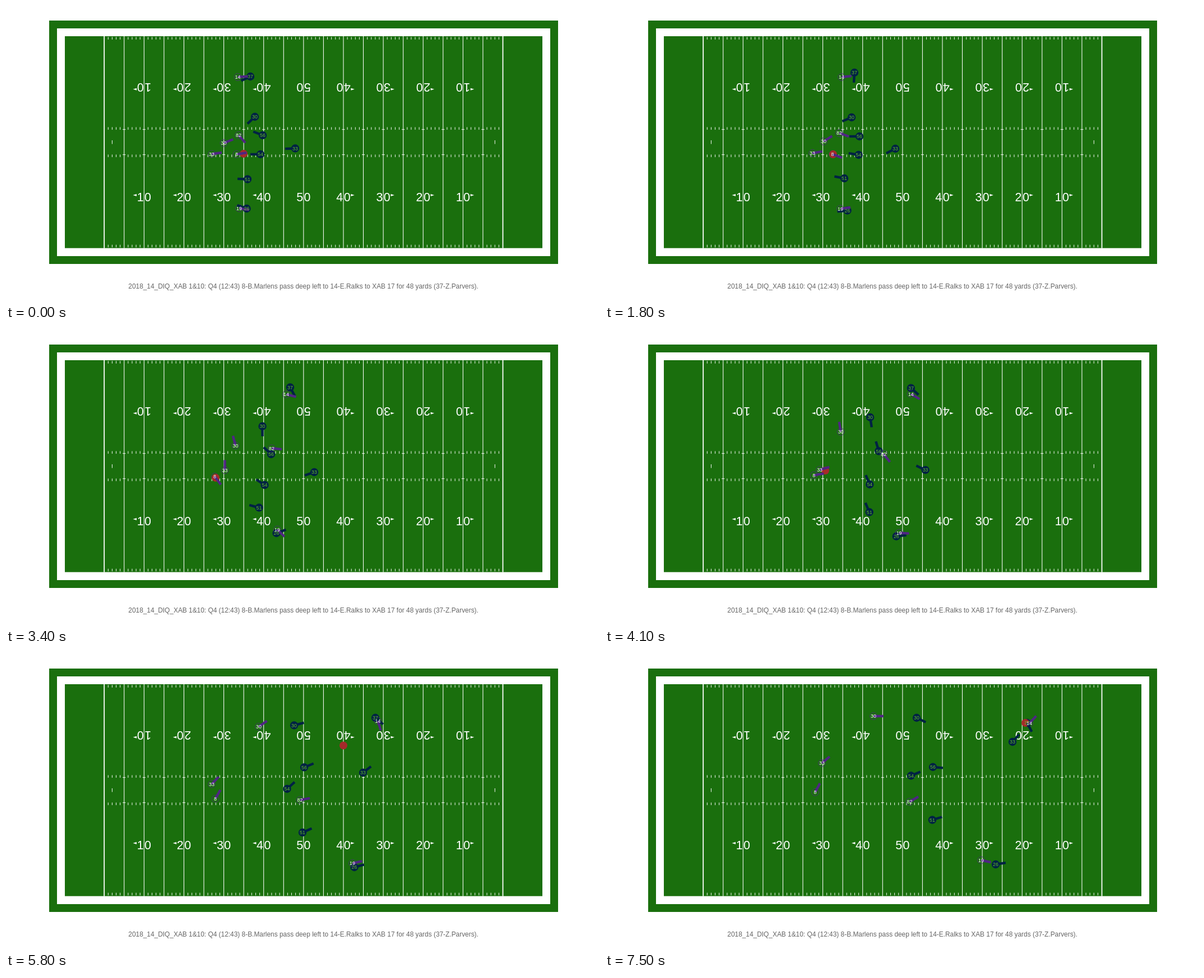
An HTML page for the animation above (7.6 s loop, 1058x529 px).

```html
<!DOCTYPE html>
<html lang="en">
<head>
<meta charset="utf-8">
<title>Play animation</title>
<style>
html, body { margin: 0; width: 100%; height: 100%; overflow: hidden; background: #fff; }
svg { display: block; width: 100%; height: 100%; }
text { font-family: "Liberation Sans", Arial, sans-serif; text-anchor: middle; }
</style>
</head>
<body>
<svg id="stage" viewBox="0 0 1058 529"></svg>
<script>
const stage = document.getElementById('stage');
const GREEN = '#1a6f0d', NAVY = '#002244', PURPLE = '#4f2683', LIME = '#69be28';
const LOOP = 7600, STEP = 100, REACH = 18;
const LEFT = 175.2, TOP = 54, BOTTOM = 432.7, YARD = 7.113;

function el(parent, tag, attrs, text) {
  const node = document.createElementNS('http://www.w3.org/2000/svg', tag);
  for (const k in attrs) node.setAttribute(k, attrs[k]);
  if (text) node.textContent = text;
  parent.appendChild(node);
  return node;
}
const layer = () => el(stage, 'g', {});
const yardX = n => LEFT + n * YARD;

function rect(x0, y0, x1, y1, fill) {
  el(stage, 'rect', { x: x0, y: y0, width: x1 - x0, height: y1 - y0, fill });
}

function drawNumbers(turn) {
  const g = el(stage, 'g', { fill: '#fff', transform: turn ? 'rotate(180 530.9 243.4)' : '' });
  for (let n = 10; n <= 90; n += 10) {
    const x = yardX(n);
    el(g, 'text', { x: x + 0.7, y: 348.6, 'font-size': 21.4, 'letter-spacing': 1.5 }, String(50 - Math.abs(50 - n)));
    if (n === 50) continue;
    const s = n < 50 ? -1 : 1;
    el(g, 'path', { d: `M${x + s * 19.8} 338l${-s * 6.5} -2v4z` });
  }
}

function drawField() {
  rect(77, 26, 985, 461, GREEN);
  rect(91, 40, 971, 447, '#fff');
  rect(105, 54, 957, 432.7, GREEN);
  let lines = '', hashes = '', ticks = '';
  for (let n = 1; n < 100; n++) {
    const x = yardX(n);
    if (n % 5) {
      for (const y of [55.3, 216.5, 265.5, 426.7]) hashes += `M${x} ${y}v4.6`;
    } else {
      lines += `M${x} ${TOP}V${BOTTOM}`;
      for (const y of [220.7, 265.7]) ticks += `M${x - 2.5} ${y}h5`;
    }
  }
  for (const n of [2, 98]) hashes += `M${yardX(n)} 240v6.6`;
  const goals = [0, 100].map(n => `M${yardX(n)} ${TOP}V${BOTTOM}`).join('');
  const stroke = (d, w) => el(stage, 'path', { d, stroke: '#fff', 'stroke-width': w, fill: 'none' });
  stroke(lines, 1.05);
  stroke(hashes, 0.95);
  stroke(ticks, 1);
  stroke(goals, 1.8);
  drawNumbers(false);
  drawNumbers(true);
  el(stage, 'text', { x: 530.6, y: 505, 'font-size': 11.9, fill: '#666' },
    '2018_14_DIQ_XAB 1&10: Q4 (12:43) 8-B.Marlens pass deep left to 14-E.Ralks to XAB 17 for 48 yards (37-Z.Parvers).');
}

drawField();
const dots = layer(), ballLayer = layer(), arms = layer(), labels = layer();
const ball = el(ballLayer, 'circle', { r: 7, fill: '#a52a2a' });

// Seconds at which players have poses; the ball is snapped at the second one.
const times = [0, 1, 1.8, 3.4, 4.7, 5.8, 6.7, 7.5];
const players = [];

function segment(ts, t) {
  let i = 0;
  while (i < ts.length - 2 && t >= ts[i + 1]) i++;
  return i;
}

function slopes(vs) {
  const h = i => times[i + 1] - times[i];
  const d = i => (vs[i + 1] - vs[i]) / h(i);
  const last = vs.length - 1;
  return vs.map((_, i) => i === 0 ? d(0) : i === last ? d(last - 1)
    : (h(i) * d(i - 1) + h(i - 1) * d(i)) / (h(i - 1) + h(i)));
}

function spline(vs) {
  const m = slopes(vs);
  return t => {
    const i = segment(times, t), h = times[i + 1] - times[i];
    const u = (t - times[i]) / h, w = 1 - u;
    return w * w * ((1 + 2 * u) * vs[i] + u * h * m[i])
      + u * u * ((3 - 2 * u) * vs[i + 1] - w * h * m[i + 1]);
  };
}

// Poses are [x, y, facing in degrees]; little happens before the snap.
function player(num, home, ...poses) {
  const [a, b] = poses;
  poses.splice(1, 0, a.map((v, i) => v + 0.22 * (b[i] - v)));
  const [x, y, dir] = [0, 1, 2].map(k => spline(poses.map(p => p[k])));
  const look = home ? { r: 7.2, fill: NAVY } : { r: 6.4, fill: 'none', stroke: PURPLE, 'stroke-opacity': 0.75 };
  players.push({
    x, y, dir,
    dot: el(dots, 'circle', look),
    arm: el(arms, 'path', { stroke: home ? NAVY : PURPLE, 'stroke-width': 4.4 }),
    label: el(labels, 'text', { 'font-size': 8.8, fill: home ? LIME : '#fff' }, num)
  });
}
const home = (num, ...poses) => player(num, true, ...poses);
const away = (num, ...poses) => player(num, false, ...poses);

home('37', [436, 126, 155], [445, 119, 93], [507, 102.5, 62], [583.5, 107, 30], [659, 114, 40], [716.5, 119, 74], [753, 123, 62]);
home('30', [444, 198, 137], [440, 199, 157], [457.5, 172, 90], [488, 143, 67], [514, 127.5, -15], [537, 117, -9], [556, 114, 26]);
home('56', [458, 231, 201], [454, 233, 180], [473, 222, 223], [503.5, 211.5, 283], [532, 202.5, 338], [563, 201, 355], [585, 202, 365]);
home('33', [516, 254.5, 178], [518, 255, 153], [550, 254, 161], [593, 242.5, 250], [637, 212, 322], [684, 185, 296], [727, 157, 312]);
home('54', [454, 265, 180], [452.5, 266, 189], [461.5, 277, 213], [483, 270, 278], [501.5, 241, 318], [525, 227, 331], [546, 217.5, 337]);
home('51', [431, 309.5, 182], [427, 308, 191], [451.5, 317.5, 195], [491.5, 329.5, 294], [529, 319, 336], [559.5, 307, 342], [584, 296.5, 343]);
home('26', [429.5, 362, 199], [432.5, 365.5, 174], [482.5, 363, 340], [555.5, 374.5, 350], [621.5, 381, 345], [666, 379, 346], [697, 376, 351]);
away('14', [413.5, 127, -4], [422, 127, -6], [500, 115, 14], [587.5, 115.5, 45], [663.5, 119.5, 73], [717, 121, 100], [757, 124, -47]);
away('30', [388.5, 245, -22], [390, 242, -32], [409.5, 206.5, -105], [431, 160.5, -82], [451, 130, -36], [467.5, 116, -24], [479, 111, 0]);
away('33', [367, 264.5, -8], [370, 263, -10], [390.5, 250.5, -90], [374.5, 248, 35], [367, 232.5, -46], [375, 211.5, -67], [387, 195, -40]);
away('8', [411.5, 265, -9], [406, 265, 20], [372.5, 262, 53], [375, 258, -61], [373.5, 258.5, -60], [373.5, 253.5, -72], [375, 247, -62]);
away('82', [415, 231, 48], [418, 227, 20], [474, 211.5, 5], [513, 235, 76], [524.5, 261, -11], [534, 265.5, -14], [543.5, 264, -30]);
away('19', [416, 361.5, 10], [420, 362.5, -8], [484, 356.5, 45], [560.5, 368.5, -30], [618, 374, -12], [651.5, 373, -16], [671, 368.5, 12]);

// Snap, drop back, throw and catch: [seconds, x, y].
const flight = [[0, 424, 264], [1, 424, 264], [1.2, 412, 264.5], [1.8, 407, 265], [3.4, 374, 264],
  [3.95, 374, 259], [4.7, 468.5, 220], [5.8, 602, 163.5], [6.7, 705, 126], [6.8, 714, 122.5], [7.5, 750, 123]];
const flightTimes = flight.map(p => p[0]);

function draw(t) {
  for (const p of players) {
    const x = p.x(t), y = p.y(t), a = p.dir(t) * Math.PI / 180;
    p.dot.setAttribute('cx', x);
    p.dot.setAttribute('cy', y);
    p.arm.setAttribute('d', `M${x} ${y}l${REACH * Math.cos(a)} ${REACH * Math.sin(a)}`);
    p.label.setAttribute('x', x);
    p.label.setAttribute('y', y + 3.2);
  }
  const i = segment(flightTimes, t), [t0, x0, y0] = flight[i], [t1, x1, y1] = flight[i + 1];
  const u = (t - t0) / (t1 - t0);
  ball.setAttribute('cx', x0 + u * (x1 - x0));
  ball.setAttribute('cy', y0 + u * (y1 - y0));
}

const start = performance.now();
function tick() {
  const ms = (performance.now() - start) % LOOP;
  draw(Math.floor(ms / STEP) * STEP / 1000);
  requestAnimationFrame(tick);
}
tick();
</script>
</body>
</html>
```
